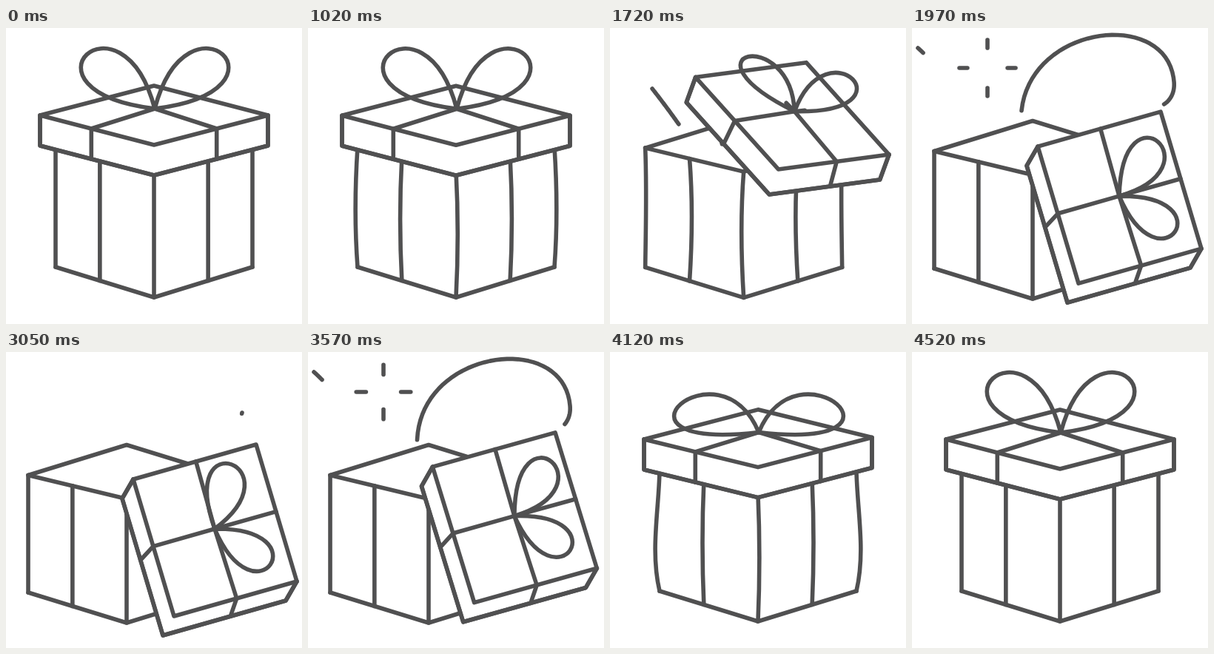
An HTML page with a canvas that plays this animation: 400x400 px, repeating every 4.55 s.

```html
<!DOCTYPE html>
<html lang="en">
<head>
<meta charset="utf-8">
<title>Gift box</title>
<style>
  html, body { margin: 0; width: 100%; height: 100%; overflow: hidden; background: #fff; }
  canvas { display: block; width: 100vmin; height: 100vmin; margin: auto; }
</style>
</head>
<body>
<canvas id="stage" width="400" height="400"></canvas>
<script>
const ctx = document.getElementById('stage').getContext('2d');
const LOOP = 4550, OPEN_AT = 1020, CLOSE_AT = 3045, CLOSE_END = 4520, SPAN = 1500;
const INK = '#505051';
const HALF = 133, RISE = 41;  // half width of the box, height of its slanted edges

const add = (a, b) => a.map((v, i) => v + b[i]);
const mix = (a, b, k) => a.map((v, i) => v + (b[i] - v) * k);

// Smooth interpolation through timed poses, without overshoot
function track(...keys) {
  const n = keys.length;
  const rate = (i, c) => (keys[i + 1][1][c] - keys[i][1][c]) / (keys[i + 1][0] - keys[i][0]);
  const slope = (i, c) => {
    if (i === 0 || i === n - 1) return 0;
    const a = rate(i - 1, c), b = rate(i, c);
    return a * b <= 0 ? 0 : 2 * a * b / (a + b);
  };
  return t => {
    if (t <= keys[0][0]) return keys[0][1];
    if (t >= keys[n - 1][0]) return keys[n - 1][1];
    let i = 0;
    while (t > keys[i + 1][0]) i++;
    const h = keys[i + 1][0] - keys[i][0], u = (t - keys[i][0]) / h, w = 1 - u;
    return keys[i][1].map((v, c) =>
      v * (1 + 2 * u) * w * w + keys[i + 1][1][c] * u * u * (3 - 2 * u) +
      h * (slope(i, c) * u * w * w - slope(i + 1, c) * u * u * w));
  };
}

// Lid: left, back and right corner, knot, and the vector down its side
const lidShut = [46,118, 200,78, 354,118, 201,109, 0,41];
const lidTilt = [92,45, 237,33, 370,135, 235,85, -11,37];
const lidDown = [172,172, 338,125, 393,310, 282,239, -15,26];
const moved = (lid, dx, dy) => lid.map((v, i) => (i > 7 ? v : v + (i % 2 ? dy : dx)));
const lidAt = track(
  [0, lidShut], [200, moved(lidShut, 0, 5)], [475, moved(lidShut, 0, -4.2)],
  [655, lidTilt], [800, moved(mix(lidTilt, lidDown, 0.58), 0, -16)],
  [975, moved(lidDown, -2, -12)], [1090, moved(lidDown, -0.4, -2)], [1230, lidDown]);
// Where the ribbon crosses the rim, and how much shows behind the knot
const ribbonAt = track([475, [0.45, 0]], [655, [0.465, 0]], [900, [0.49, 1]]);

// Bow: each loop is one curve that leaves and re-enters the knot
const pair = (x1, y1, x2, y2) => [x1, y1, x2, y2, -x1, y1, -x2, y2];
const bowTall = pair(-45, -170, -200, -25);
const bowAt = track(
  [0, bowTall], [200, bowTall], [475, pair(-55, -118, -235, 38)],
  [655, [-35,-128, -200,-50, 30,-136, 195,-15]],
  [975, [136,-39, 4,-156, 145,-2, 56,130]],
  [1250, [113,-85, -52,-147, 145,-2, 56,130]]);

// Box: centre, height of the rim and of the base
const boxAt = track([500, [200, 161, 323]], [655, [189, 161, 323]], [900, [163, 166.5, 325]]);
// Bulge of the uprights: outer upper and lower, inner upper and lower
const bulgeAt = track(
  [0, [0, 0, 0, 0]], [25, [3.5, 4, 3, 3]], [180, [8, 9, 5, 5]],
  [475, [-1, 13, 1, 1]], [655, [-3, -1, -6, -5]], [860, [0, 0, 0, 0]]);

// Streaks: tail and head as positions along joined curves
const curlEnds = track([680, [-0.12, -0.12]], [975, [0, 1.4]], [1200, [0.95, 2]],
                       [1470, [1.99, 2]], [1490, [2, 2]]);
const sparkEnds = track([625, [0, 0]], [655, [0.1, 0.22]], [860, [0.65, 1]],
                        [975, [0.93, 1]], [1150, [1, 1]]);
const burstEnds = track([800, [8, 8]], [880, [13, 27]], [975, [27, 38]], [1140, [38, 38]]);
const curlPath = [[148,112], [160,-5], [345,-27], [354,72], [358,110], [310,120], [319,82]];
const sparkPath = [[120,171], [100,137], [40,55], [8,27]];

function path(points, closed, fill) {
  ctx.beginPath();
  points.forEach(p => ctx.lineTo(p[0], p[1]));
  if (closed) ctx.closePath();
  if (fill) ctx.fill();
  ctx.stroke();
}

function curve(a, b, c, d) {
  ctx.beginPath();
  ctx.moveTo(...a);
  ctx.bezierCurveTo(...b, ...c, ...d);
  ctx.stroke();
}

function along(points, u) {
  const s = Math.max(0, Math.min((points.length - 1) / 3 - 1, Math.floor(u)));
  let p = points.slice(3 * s, 3 * s + 4);
  while (p.length > 1) p = p.slice(1).map((q, i) => mix(p[i], q, u - s));
  return p[0];
}

function streak(points, [tail, head]) {
  if (head - tail < 0.004) return;
  const steps = 50, line = [];
  for (let i = 0; i <= steps; i++) line.push(along(points, tail + (head - tail) * i / steps));
  path(line);
}

function burst([inner, outer]) {
  if (outer - inner < 0.2) return;
  for (const [x, y] of [[1, 0], [0, 1], [-1, 0], [0, -1]])
    path([inner, outer].map(r => [102 + x * r, 54 + y * r]));
}

function drawBox(t) {
  const [x, top, base] = boxAt(t), [outUp, outLow, inUp, inLow] = bulgeAt(t);
  // Points on the two front walls, from -1 at the left to 1 at the right
  const rim = s => [x + s * HALF, top + 32 * (1 - Math.abs(s))];
  const foot = s => [x + s * HALF, base + RISE * (1 - Math.abs(s))];

  path([rim(-1), [x, top - RISE], rim(1)]);
  streak(curlPath, curlEnds(t));
  streak(sparkPath, sparkEnds(t));
  burst(burstEnds(t));
  path([rim(-1), rim(0), rim(1)]);
  path([foot(-1), foot(0), foot(1)]);
  for (const s of [-1, -0.55, 0, 0.55, 1]) {
    const side = s < 0 ? -1 : 1, outer = Math.abs(s) === 1;
    const a = rim(s), b = foot(s);
    curve(a, add(mix(a, b, 1 / 3), [side * (outer ? outUp : inUp), 0]),
          add(mix(a, b, 2 / 3), [side * (outer ? outLow : inLow), 0]), b);
  }
}

function drawLid(t) {
  const lid = lidAt(t), bow = bowAt(t), [k, shown] = ribbonAt(t);
  const [left, back, right, knot, down] = [0, 2, 4, 6, 8].map(i => lid.slice(i, i + 2));
  const front = left.map((v, i) => v + right[i] - back[i]);
  const [lowLeft, lowFront, lowRight] = [left, front, right].map(p => add(p, down));

  path([left, back, right, lowRight, lowFront, lowLeft], true, true);
  path([left, front, right]);
  path([left, lowLeft, lowFront, lowRight, right]);
  for (const [corner, low, far] of [[left, lowLeft, right], [right, lowRight, left]])
    path([mix(low, lowFront, 0.45), mix(corner, front, k), knot, mix(knot, mix(back, far, k), shown)]);
  for (const i of [0, 4])
    curve(knot, add(knot, bow.slice(i, i + 2)), add(knot, bow.slice(i + 2, i + 4)), knot);
}

// Opens, rests, then runs the same motion backwards
function phase(ms) {
  if (ms < OPEN_AT) return 0;
  return ms < CLOSE_AT ? Math.min(SPAN, ms - OPEN_AT + 25) : Math.max(0, CLOSE_END - ms);
}

function draw(ms) {
  const t = phase(ms);
  ctx.fillStyle = '#fff';
  ctx.fillRect(0, 0, 400, 400);
  ctx.strokeStyle = INK;
  ctx.lineWidth = 5.6;
  ctx.lineCap = ctx.lineJoin = 'round';
  drawBox(t);
  drawLid(t);
}

const start = performance.now();
function tick() {
  draw((performance.now() - start) % LOOP);
  requestAnimationFrame(tick);
}
tick();
</script>
</body>
</html>
```
